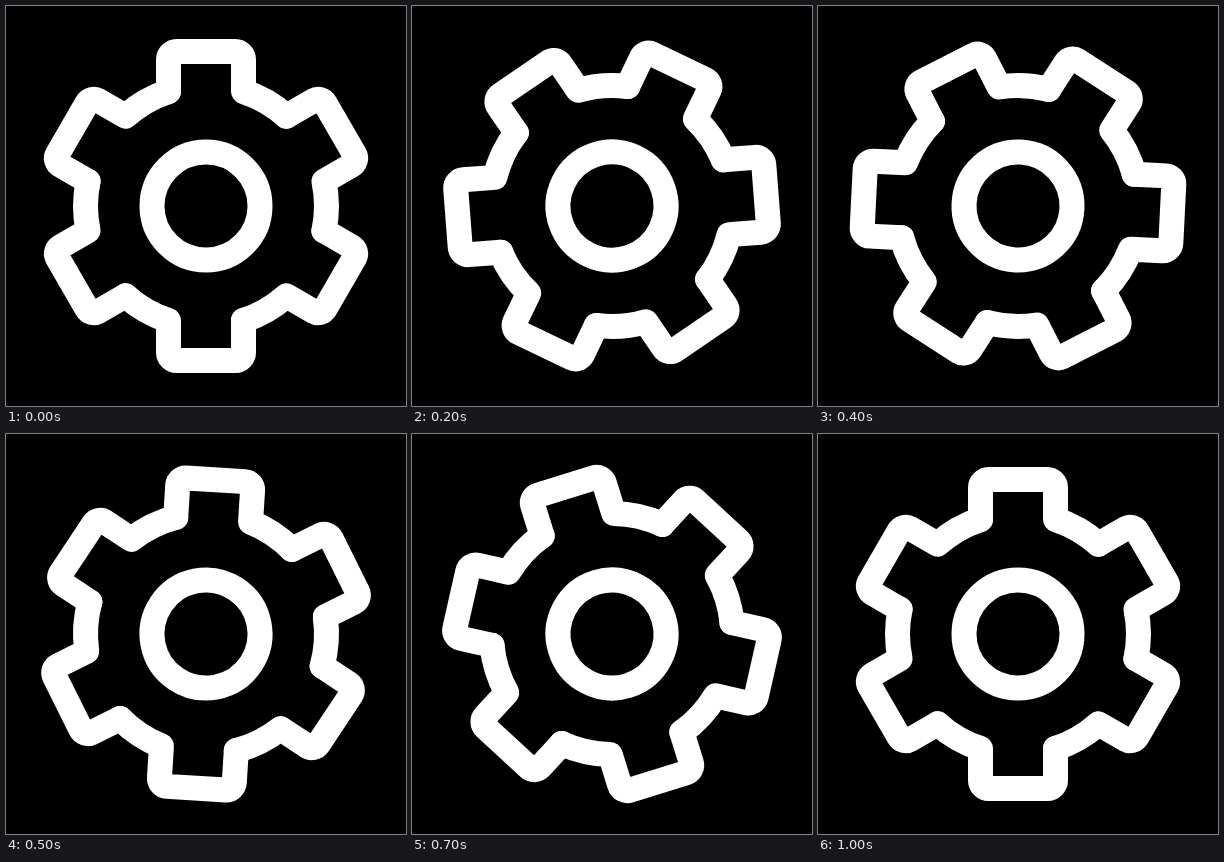
Recreate the animation shown at these times as an HTML page. Size 400 px wide and 400 px high, loop 1.02 s.

```html
<!DOCTYPE html>
<html lang="en">
<head>
<meta charset="utf-8">
<title>Turning gear</title>
<style>
  html, body { margin: 0; width: 100%; height: 100%; overflow: hidden; background: #000; }
  svg { display: block; width: 100vw; height: 100vh; }
  #gear { fill: none; stroke: #fff; stroke-width: 25; stroke-linecap: round; stroke-linejoin: round; }
</style>
</head>
<body>
<svg viewBox="-200 -200 400 400">
  <defs>
    <!-- one tooth and the rim up to the next tooth -->
    <path id="tooth" d="M-37.5-114.5V-146.5a8 8 0 0 1 8-8h59a8 8 0 0 1 8 8V-114.5A120.5 120.5 0 0 1 80.41-89.73"/>
  </defs>
  <g id="gear">
    <circle r="54"/>
    <use href="#tooth"/>
    <use href="#tooth" transform="rotate(60)"/>
    <use href="#tooth" transform="rotate(120)"/>
    <use href="#tooth" transform="rotate(180)"/>
    <use href="#tooth" transform="rotate(240)"/>
    <use href="#tooth" transform="rotate(300)"/>
  </g>
</svg>
<script>
  const LOOP = 1020, STEPS = 40, TURN = 180;
  const X1 = 0.333, X2 = 0.378;
  const gear = document.getElementById('gear');

  // cubic-bezier(X1, 0, X2, 1), solved by bisection
  function ease(x) {
    if (x <= 0 || x >= 1) return Math.min(1, Math.max(0, x));
    let lo = 0, hi = 1, s = 0.5;
    for (let i = 0; i < 30; i++) {
      s = (lo + hi) / 2;
      const r = 1 - s;
      if (3 * r * r * s * X1 + 3 * r * s * s * X2 + s * s * s < x) lo = s;
      else hi = s;
    }
    return s * s * (3 - 2 * s);
  }

  // poses are held for 20 ms and 30 ms in turn
  function stepAt(t) {
    return Math.min(STEPS, 2 * Math.floor(t / 50) + (t % 50 >= 20 ? 1 : 0));
  }

  function draw() {
    const t = performance.now() % LOOP;
    const angle = TURN * ease(stepAt(t) / STEPS);
    gear.setAttribute('transform', `rotate(${angle.toFixed(3)})`);
    requestAnimationFrame(draw);
  }
  draw();
</script>
</body>
</html>
```
